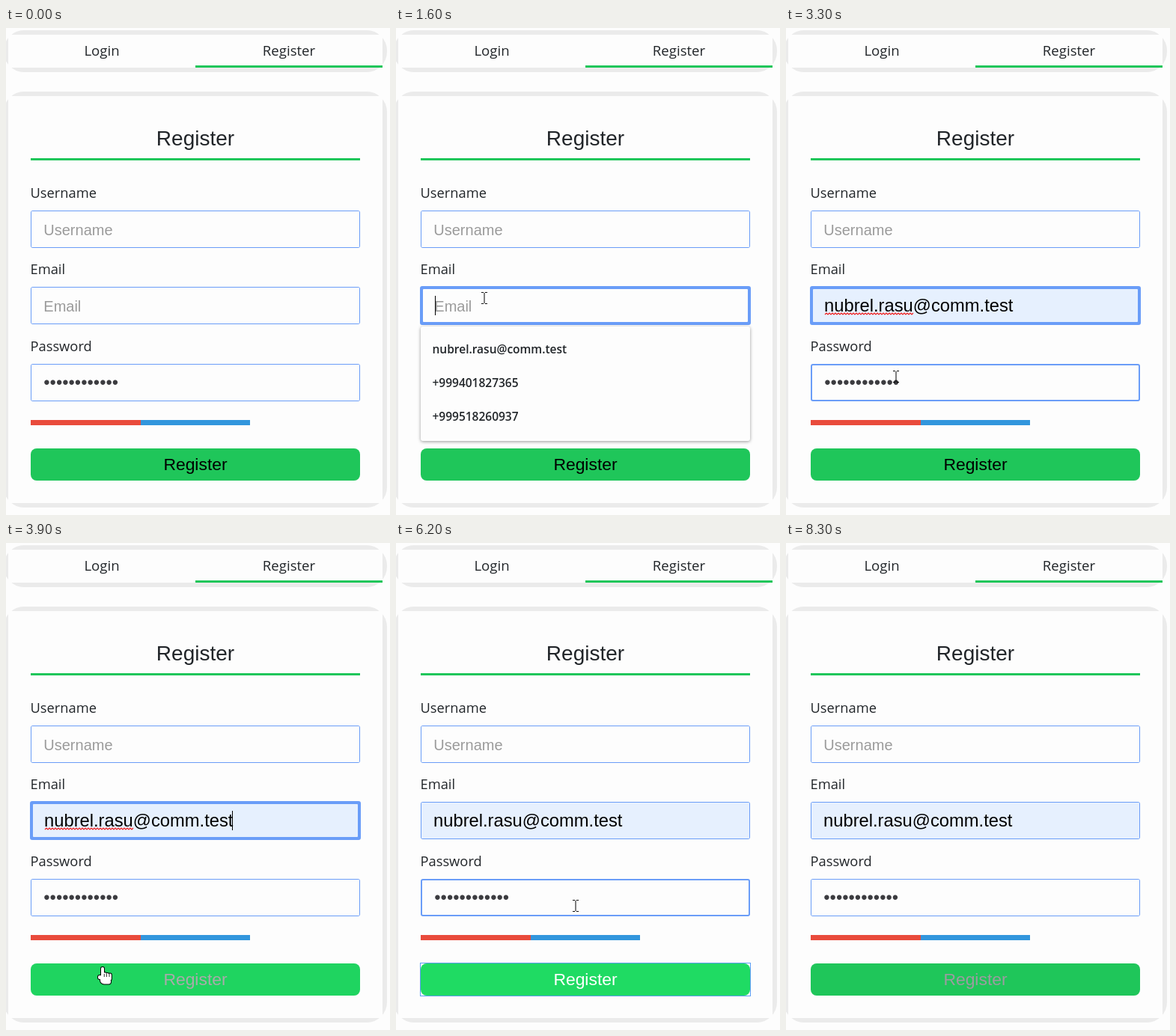
Animation, 513 px wide and 651 px high, one loop 8.4 s. Source, as an HTML page with a canvas:

```html
<!DOCTYPE html>
<html lang="en">
<head>
<meta charset="utf-8">
<title>Register form</title>
<style>
html, body { margin: 0; width: 100%; height: 100%; overflow: hidden; background: #fdfdfd; }
canvas { display: block; }
</style>
</head>
<body>
<canvas id="stage" width="513" height="651"></canvas>
<script>
const ctx = document.getElementById('stage').getContext('2d');
const LOOP = 8400, STEP = 100;
const PAPER = '#fdfdfd', INK = '#212529', GREEN = '#1fc65a', BRIGHT = '#1fdb63', BLUE = '#6a9df8';
const ARIAL = '"Liberation Sans", Arial, sans-serif';
const HUMAN = '"Open Sans", "Noto Sans", sans-serif';
const MAIL = 'nubrel.rasu@comm.test';
const SUGGESTIONS = [MAIL, '+999401827365', '+999518260937'];
const FIELD_TOP = { Username: 244, Email: 346, Password: 449 };
const OPENED = 1300, HIGHLIGHTED = 1900, CHOSEN = 2700, CLICKED = 5200, RELEASED = 8300;

// Pointer moves: from, until, x, y; each eases out from the previous stop
const ENTRY = { x: 205, y: 8 };
const MOVES = [
  [400, 1200, 118, 361],
  [1700, 2200, 123, 432],
  [2800, 3100, 130, 446],
  [3200, 3300, 147, 466],
  [3300, 4100, 127, 574],
  [4100, 4400, 237, 573],
  [6100, 6500, 243, 371],
  [6600, 7000, 262, -20]
];

const between = (t, a, b) => t >= a && t < b;
const progress = (t, a, b) => Math.max(0, Math.min(1, (t - a) / (b - a)));
const easeOut = k => 1 - (1 - k) ** 2;

function pointerAt(t) {
  if (!between(t, 400, 7000)) return null;
  let { x, y } = ENTRY;
  for (const [from, until, toX, toY] of MOVES) {
    const k = easeOut(progress(t, from, until));
    x += (toX - x) * k;
    y += (toY - y) * k;
  }
  return { x: Math.round(x), y: Math.round(y) };
}

function mix(a, b, k) {
  const channel = (c, i) => parseInt(c.slice(i, i + 2), 16);
  return `rgb(${[1, 3, 5].map(i => channel(a, i) * (1 - k) + channel(b, i) * k)})`;
}

function rect(x, y, w, h, color, radius = 0) {
  ctx.fillStyle = color;
  ctx.beginPath();
  ctx.roundRect(x, y, w, h, radius);
  ctx.fill();
}

function text(str, x, y, font, color = INK, align = 'left') {
  ctx.font = font;
  ctx.fillStyle = color;
  ctx.textAlign = align;
  ctx.fillText(str, x, y);
}

function panel(y, h) {
  rect(-3, y - 6, 512, h + 12, '#ebebeb', 27);
  rect(3, y, 500, h, PAPER);
}

function field(y, hover, focus, fill) {
  const outer = focus ? 1 : 0, inner = focus ? 3 : hover ? 2 : 1;
  rect(33 - outer, y - outer, 440 + 2 * outer, 50 + 2 * outer, BLUE, 3);
  rect(33 + inner, y + inner, 440 - 2 * inner, 50 - 2 * inner, fill, 1);
}

function squiggle(x, end, y) {
  ctx.strokeStyle = '#f01818';
  ctx.lineWidth = 1.2;
  ctx.beginPath();
  for (let i = 0; x + i * 2 <= end; i++) ctx.lineTo(x + i * 2, y + (i % 2 ? -1 : 1));
  ctx.stroke();
}

function dropdown(alpha, active) {
  ctx.save();
  ctx.globalAlpha = alpha;
  ctx.shadowColor = 'rgba(0,0,0,.4)';
  ctx.shadowBlur = 4;
  ctx.shadowOffsetY = 1;
  rect(33, 399, 440, 153, PAPER, 3);
  ctx.shadowColor = 'transparent';
  if (active) rect(33, 407, 440, 45, '#c8c8c8');
  SUGGESTIONS.forEach((s, i) => text(s, 48.5, 435 + i * 45, '600 15.5px ' + HUMAN));
  ctx.restore();
}

const cursors = {
  arrow() {
    const outline = new Path2D('M.5 .5V14l3.1-3 2.4 5.5 2.4-1L6 10.3h4.3z');
    ctx.lineWidth = 1.2;
    ctx.strokeStyle = '#fff';
    ctx.stroke(outline);
    ctx.fillStyle = '#000';
    ctx.fill(outline);
  },
  beam() {
    rect(-.5, -7, 1, 14, '#000');
    for (const y of [-8, 7]) for (const x of [-4, 1]) rect(x, y, 3, 1, '#000');
  },
  hand() {
    const hand = new Path2D();
    hand.roundRect(-1, 0, 4, 16, 2);
    for (let i = 1; i < 4; i++) hand.roundRect(-1 + i * 3.4, 6.5 + i * .7, 3.6, 9, 1.8);
    hand.roundRect(-5, 11, 5, 5, 2);
    hand.roundRect(-2, 12, 14, 10.5, [0, 2, 3, 5]);
    ctx.lineWidth = 2;
    ctx.strokeStyle = '#000';
    ctx.stroke(hand);
    ctx.fillStyle = '#fff';
    ctx.fill(hand);
    for (let i = 1; i < 4; i++) rect(-.6 + i * 3.4, 9, .8, 4, '#000');
  }
};

function drawEmail(t, y, hover) {
  const focus = between(t, OPENED, CLICKED);
  const filled = t >= CHOSEN, preview = between(t, HIGHLIGHTED, CHOSEN);
  const nudge = focus || hover ? 1 : 0;
  field(y, hover, focus, filled || preview ? '#e6f0fe' : PAPER);
  if (filled || preview) {
    text(MAIL, 50 + nudge, y + 33, (filled ? 23.75 : 16.67) + 'px ' + ARIAL, '#000');
  } else {
    text('Email', 50.3 + nudge, y + 32.5 + nudge / 2, '20px ' + ARIAL, '#9b9b9b');
  }
  if (!focus) return;

  // The caret blinks and restarts whenever the value changes
  if (filled) squiggle(52, 170, y + 36);
  const since = filled ? t - CHOSEN - 100 : preview ? t - HIGHLIGHTED - 100 : t - OPENED;
  if (since % 1000 < 500) rect(filled ? 302 : 52, y + 12, 1, 26, '#000');
}

function drawButton(t) {
  const lit = t < RELEASED ? progress(t, 3700, 4000) : 0;
  rect(33, 562, 440, 43, mix(GREEN, BRIGHT, lit), 8);
  const caption = t < RELEASED ? mix('#000000', '#ffffff', lit) : '#9c9ca0';
  text('Register', 253, 591, '22.9px ' + ARIAL, caption, 'center');
  if (between(t, CLICKED, RELEASED)) {
    ctx.strokeStyle = '#5b9df5';
    ctx.lineWidth = 1;
    ctx.strokeRect(32.5, 561.5, 441, 44);
  }
}

function draw(t) {
  const pointer = pointerAt(t);
  const over = (y, h) => pointer && between(pointer.x, 33, 473) && between(pointer.y, y, y + h);
  const listOpen = between(t, OPENED + 100, CHOSEN);

  rect(0, 0, 513, 651, PAPER);
  panel(9, 44);
  panel(91, 544);
  text('Login', 128, 37, '18.6px ' + HUMAN, INK, 'center');
  text('Register', 378, 37, '18.6px ' + HUMAN, INK, 'center');
  rect(253, 50, 250, 3, GREEN);
  text('Register', 253, 157, '28px ' + ARIAL, INK, 'center');
  rect(33, 174, 440, 3, GREEN);

  let hovered = null;
  for (const [name, y] of Object.entries(FIELD_TOP)) {
    const hover = over(y, 50) && !(listOpen && name === 'Password');
    if (hover) hovered = name;
    text(name, 32.5, y - 17, '18.3px ' + HUMAN);
    if (name === 'Email') {
      drawEmail(t, y, hover);
      continue;
    }
    field(y, hover, false, PAPER);
    const left = hover ? 51.3 : 50.3;
    if (name === 'Password') text('•'.repeat(12), left, y + 33, '23.75px ' + ARIAL, '#3c3c40');
    else text(name, left, y + 33, '20px ' + ARIAL, '#9b9b9b');
  }

  rect(33, 524, 147, 7, '#e94b3c');
  rect(180, 524, 146, 7, '#3296dd');
  drawButton(t);
  if (listOpen) dropdown(progress(t, OPENED, OPENED + 300), t >= HIGHLIGHTED);

  if (pointer) {
    ctx.save();
    ctx.translate(pointer.x, pointer.y);
    cursors[over(562, 43) ? 'hand' : hovered ? 'beam' : 'arrow']();
    ctx.restore();
  }
}

const start = performance.now();
function tick() {
  const t = (performance.now() - start) % LOOP;
  draw(Math.floor(t / STEP) * STEP);
  requestAnimationFrame(tick);
}
tick();
</script>
</body>
</html>
```
